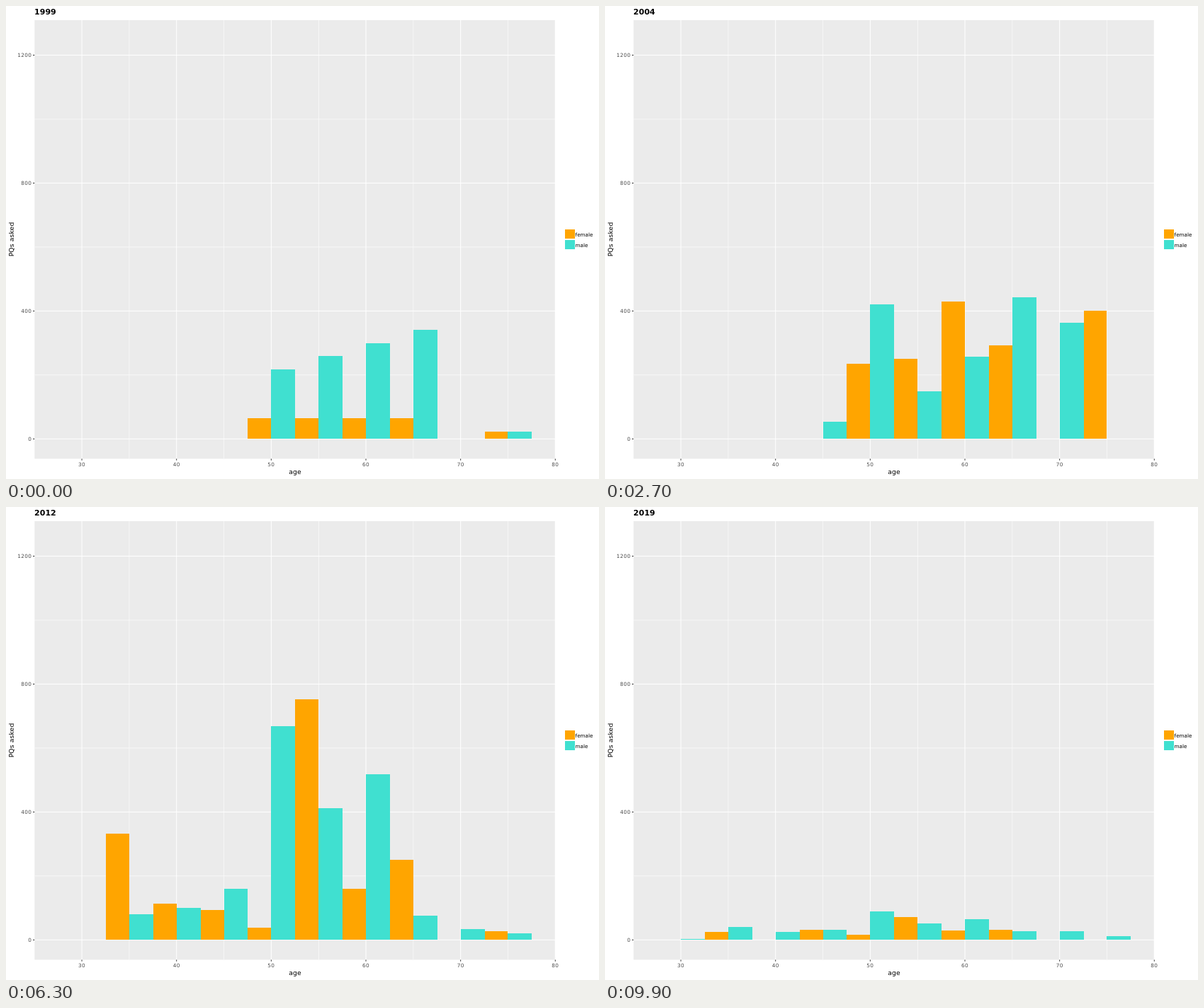
Write an HTML page with a canvas that moves like this. It is 837 px wide and 669 px high and loops after 10 s.

```html
<!DOCTYPE html>
<html lang="en">
<head>
<meta charset="utf-8">
<title>PQs asked by age</title>
<style>
html, body { margin: 0; width: 100%; height: 100%; overflow: hidden; background: #fff; }
canvas { display: block; }
</style>
</head>
<body>
<canvas id="chart" width="837" height="669"></canvas>
<script>
const ctx = document.getElementById('chart').getContext('2d');
const FEMALE = '#ffa500', MALE = '#40e0d0';
const BASE = 612, STEPS = 100, STEP_MS = 100;
const xAt = age => 107.05 + (age - 30) * 13.365;
const yAt = n => 612.3 - n * 0.4523;

// Steps of the key poses, and the step at which a new bar starts to grow towards each.
const keySteps = [0, 9, 27, 47, 63, 85, 94, 99];
const growFrom = [0, 5, 20, 40, 55, 85, 90, 90];
const LEAVE_DELAY = 5;

// The opening year rises with age for men and is flat for women.
function opening(age, sex) {
  if (age === 75) return 10;
  if (age < 50 || age > 65) return 0;
  return sex === FEMALE ? 29 : 98 + (age - 50) * 3.74;
}

// Heights are given from the key pose "first" on; the last one holds until the closing drop.
function bar(age, sex, first, heights, closing = 1.7 * Math.sqrt(heights.at(-1))) {
  const poses = keySteps.map((_, i) =>
    i < first ? 0 : heights[Math.min(i - first, heights.length - 1)]);
  poses[0] = opening(age, sex);
  poses[7] = closing;
  return { age, sex, poses };
}

const bars = [
  bar(30, FEMALE, 5, [10], 0),
  bar(30, MALE, 5, [74], 1),
  bar(35, FEMALE, 4, [150, 41]),
  bar(35, MALE, 4, [36, 109]),
  bar(40, FEMALE, 3, [17, 51, 25], 0),
  bar(40, MALE, 3, [49, 45, 41]),
  bar(45, FEMALE, 3, [91, 42, 69]),
  bar(45, MALE, 2, [24, 123, 72, 69]),
  bar(50, FEMALE, 1, [72, 106, 38, 17]),
  bar(50, MALE, 1, [226, 190, 193, 302, 547]),
  bar(55, FEMALE, 1, [71, 113, 348, 340, 353]),
  bar(55, MALE, 1, [185, 67, 157, 186, 179]),
  bar(60, FEMALE, 1, [83, 194, 110, 72, 62]),
  bar(60, MALE, 1, [185, 116, 289, 234, 298]),
  bar(65, FEMALE, 1, [74, 132, 39, 113, 72]),
  bar(65, MALE, 1, [295, 200, 45, 34, 54]),
  bar(70, MALE, 1, [32, 164, 0, 15, 49]),
  bar(75, FEMALE, 1, [120, 181, 40, 12, 9], 0),
  bar(75, MALE, 1, [45, 0, 19, 9])
];

function heightAt({ poses }, step) {
  const next = Math.max(1, keySteps.findIndex(k => k >= step));
  const start = keySteps[next - 1], end = keySteps[next];
  const a = poses[next - 1], b = poses[next], grow = growFrom[next];
  if (step === end) return b;
  if (a && b) return a + (b - a) * (step - start) / (end - start);
  if (b) return Math.max(0, b * (step - grow + 1) / (end - grow + 1));
  return step < grow + LEAVE_DELAY ? a : 0;
}

function rect(x, y, w, h, color) {
  ctx.fillStyle = color;
  ctx.fillRect(x, y, w, h);
}

function text(str, x, y, size, color, align = 'left', spacing = 0, weight = '') {
  ctx.font = `${weight} ${size}px "DejaVu Sans", sans-serif`;
  ctx.letterSpacing = spacing + 'px';
  ctx.textAlign = align;
  ctx.fillStyle = color;
  ctx.fillText(str, x, y);
}

function drawGrid() {
  rect(40.3, 20, 734.8, 620.4, '#ebebeb');
  for (let age = 35; age < 80; age += 10) rect(xAt(age) - 0.25, 20, 0.55, 620.4, '#fff');
  for (let n = 200; n < 1200; n += 400) rect(40.3, yAt(n) - 0.25, 734.8, 0.55, '#fff');
  for (let age = 30; age <= 80; age += 10) {
    const x = xAt(age);
    rect(x - 0.5, 20, 1, 620.4, '#fff');
    rect(x - 0.5, 640.4, 1, 2.3, '#333');
    text(age, x, 650.6, 7.3, '#4d4d4d', 'center', 0.35);
  }
  for (let n = 0; n <= 1200; n += 400) {
    const y = yAt(n);
    rect(40.3, y - 0.5, 734.8, 1, '#fff');
    rect(38, y - 0.5, 2.3, 1, '#333');
    text(n, 36.2, y + 2.8, 7.3, '#4d4d4d', 'right', 0.35);
  }
}

// Women stand left of each age, men right; edges sit on whole pixels.
function drawBar(b, step) {
  const h = heightAt(b, step);
  if (!h) return;
  const middle = Math.round(xAt(b.age));
  const outer = Math.round(xAt(b.age + (b.sex === FEMALE ? -2.5 : 2.5)) + 0.5);
  const top = Math.round(BASE - h);
  rect(Math.min(middle, outer), top, Math.abs(outer - middle), BASE - top, b.sex);
}

function drawLabels(year) {
  text(year, 40.1, 12, 11, '#000', 'left', 0, 'bold');
  text('age', 408, 662.3, 9.2, '#000', 'center', 0.15);
  ctx.save();
  ctx.translate(10.8, 330);
  ctx.rotate(-Math.PI / 2);
  text('PQs asked', 0, 0, 9.2, '#000', 'center', 0.15);
  ctx.restore();
  [['female', FEMALE], ['male', MALE]].forEach(([label, color], i) => {
    rect(789, 316 + i * 15, 14, 13, color);
    text(label, 803.6, 326 + i * 14.5, 7.2, '#000');
  });
}

function draw(now) {
  const step = Math.floor(now / STEP_MS) % STEPS;
  rect(0, 0, 837, 669, '#fff');
  drawGrid();
  bars.forEach(b => drawBar(b, step));
  drawLabels(1999 + Math.round(step * 20 / (STEPS - 1)));
}

const start = performance.now();
function tick() {
  draw(performance.now() - start);
  requestAnimationFrame(tick);
}
tick();
</script>
</body>
</html>
```
